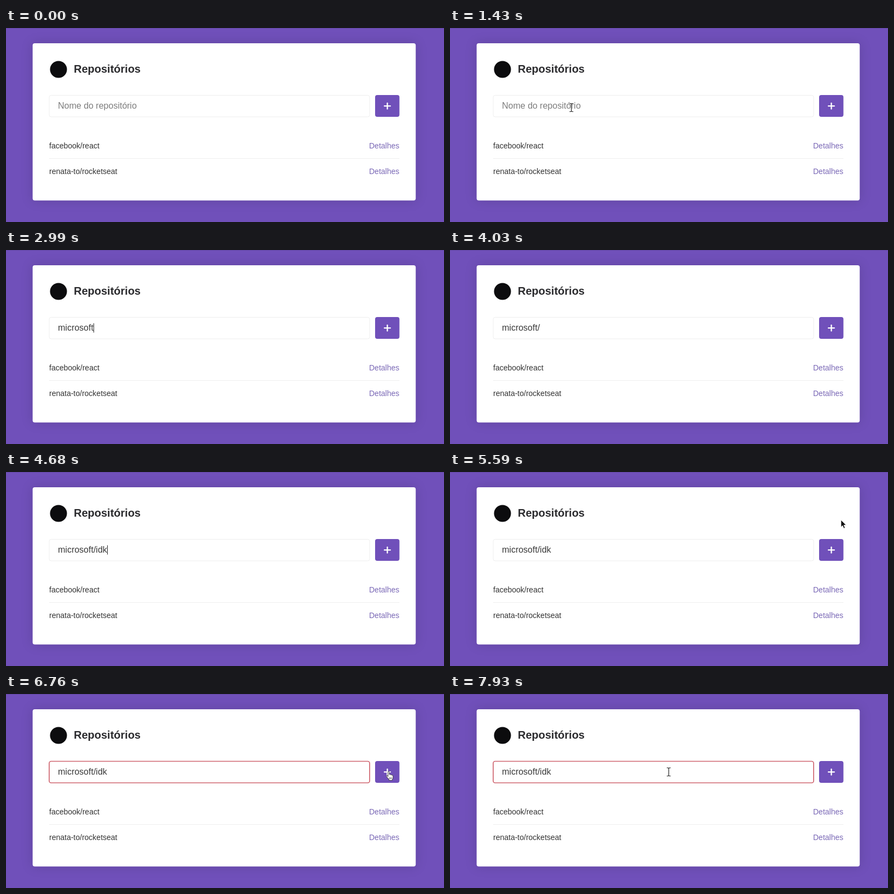
Write an HTML page that moves like this. It is 801 px wide and 356 px high and loops after 8000 ms.

```html
<!DOCTYPE html>
<html lang="pt-BR">
<head>
<meta charset="utf-8">
<title>Repositórios</title>
<style>
  html, body { margin: 0; width: 100%; height: 100%; overflow: hidden; background: #7050ba; }
  svg { display: block; width: 801px; height: 356px; }
  text { font: 14px "Liberation Sans", Arial, sans-serif; fill: #333; }
  .title { font-size: 20px; font-weight: bold; fill: #2b2b2e; }
  .field { font-size: 16px; }
  .link { fill: #7a68b6; }
  .card { fill: #fff; filter: drop-shadow(0 0 10px rgba(0, 0, 0, .14)); }
  .hidden { display: none; }
</style>
</head>
<body>
<svg viewBox="0 0 801 356">
  <rect width="801" height="356" fill="#7050ba"/>
  <rect width="801" height="1" fill="#000" opacity=".1"/>
  <rect class="card" x="48.7" y="28" width="700.6" height="288.5" rx="4"/>

  <circle cx="96" cy="76" r="15.5" fill="#0c0c0e"/>
  <text class="title" x="124" y="82">Repositórios</text>

  <rect id="box" x="79" y="123.5" width="586" height="39.5" rx="3.5" fill="#fff"/>
  <text id="field" class="field" x="95" y="148"></text>
  <rect id="caret" y="134.5" width="1" height="17" fill="#222"/>

  <rect id="button" x="675" y="123" width="44.5" height="40" rx="4"/>
  <path id="plus" d="M692 143.2h10.8M697.4 137.8v10.8" stroke="#fff" stroke-width="2.3" stroke-linecap="round"/>
  <g id="spinner" fill="#fff"></g>

  <text x="79" y="221">facebook/react</text>
  <text class="link" x="664" y="221">Detalhes</text>
  <path d="M79 239.5h640.5" stroke="#eee"/>
  <text x="79" y="268">renata-to/rocketseat</text>
  <text class="link" x="664" y="268">Detalhes</text>

  <g id="pointer">
    <path id="arrow" d="M0 0v13.2l3-2.8 2.2 5 2.3-1-2.2-4.9h4.2z" fill="#111" stroke="#fff" stroke-width=".8"/>
    <g id="beam" fill="none">
      <path d="M-3.5-7.5h2.3l1.2 1 1.2-1h2.3M0-6.5v13M-3.5 7.5h2.3l1.2-1 1.2 1h2.3" stroke="#fff" stroke-width="2.6" opacity=".7"/>
      <path d="M-3.5-7.5h2.3l1.2 1 1.2-1h2.3M0-6.5v13M-3.5 7.5h2.3l1.2-1 1.2 1h2.3" stroke="#222" stroke-width="1.2"/>
    </g>
    <path id="hand" d="M.6 9.5V1.2a1.2 1.2 0 0 1 2.4 0v4.6q1.8-1 2.4.5 1.7-.7 2.3.7 2-.5 2.1 1.5v3q0 1.6-1.2 3v1.8H2.4v-1.6Q-.4 12-2.2 9.2q-.6-1.5.7-1.6 1 .1 2.1 1.9zM5 11.2v2.6M7 11.2v2.6M3.1 11.2v2.6" fill="#fff" stroke="#333" stroke-width=".9" stroke-linejoin="round"/>
  </g>
</svg>
<script>
const LOOP = 8000, STEP = 130;
const LOAD = 6240, FAIL = 6760;
const TEXT = "microsoft/idk";
const keyTimes = [1690, 1820, 1950, 2080, 2210, 2470, 2600, 2730, 2990, 4030, 4160, 4550, 4680];
const caretOn = [[1560, 3510], [4160, 5200]];

// Pointer tracks: points of [time, x, y], shown until "end".
const tracks = [
  { end: 1690, pts: [[130, 262, 313], [390, 241, 222], [780, 222, 146]] },
  { end: LOOP, pts: [[5200, 729, 7], [5590, 715, 88], [5980, 698, 142], [7670, 698, 142], [7930, 400, 143]] }
];

const $ = id => document.getElementById(id);
const show = (id, on) => $(id).classList.toggle("hidden", !on);
const within = (t, [a, b]) => t >= a && t < b;

// Seven dots of an eight-place ring
for (let i = 0; i < 7; i++) {
  const a = i * Math.PI / 4;
  const dot = document.createElementNS("http://www.w3.org/2000/svg", "circle");
  dot.setAttribute("cx", 5.7 * Math.cos(a));
  dot.setAttribute("cy", 5.7 * Math.sin(a));
  dot.setAttribute("r", 1.3);
  $("spinner").append(dot);
}

function place(pts, t) {
  for (let i = 1; i < pts.length; i++) {
    const [t0, x0, y0] = pts[i - 1], [t1, x1, y1] = pts[i];
    if (t <= t1) {
      const k = (t - t0) / (t1 - t0);
      return [x0 + (x1 - x0) * k, y0 + (y1 - y0) * k];
    }
  }
  return pts[pts.length - 1].slice(1);
}

function drawPointer(t) {
  const track = tracks.find(r => within(t, [r.pts[0][0], r.end]));
  show("pointer", track);
  if (!track) return;
  const [x, y] = place(track.pts, t);
  const inRow = y > 123 && y < 163;
  const beam = inRow && x > 79 && x < 665;
  const hand = inRow && x > 675 && x < 719;
  show("beam", beam);
  show("hand", hand);
  show("arrow", !beam && !hand);
  $("pointer").setAttribute("transform", `translate(${x} ${y})`);
}

function drawField(t) {
  const typed = TEXT.slice(0, keyTimes.filter(k => k <= t).length);
  const field = $("field");
  field.textContent = typed || "Nome do repositório";
  field.style.fill = typed ? "#3a3a3a" : "#7d7d7d";
  const width = typed ? field.getComputedTextLength() : 0;
  $("caret").setAttribute("x", 95 + Math.round(width));
  show("caret", caretOn.some(span => within(t, span)));
  const failed = t >= FAIL;
  $("box").setAttribute("stroke", failed ? "#cf6570" : "#eee");
  $("box").setAttribute("stroke-width", failed ? 1.7 : 1);
}

function drawButton(t) {
  const busy = within(t, [LOAD, FAIL]);
  $("button").setAttribute("fill", busy ? "#a996d8" : "#7050ba");
  show("plus", !busy);
  show("spinner", busy);
  $("spinner").setAttribute("transform", `translate(697.4 143) rotate(${(t - LOAD) * .18})`);
}

function frame(now) {
  const t = Math.floor((now % LOOP) / STEP) * STEP;
  drawField(t);
  drawButton(t);
  drawPointer(t);
  requestAnimationFrame(frame);
}
frame(0);
</script>
</body>
</html>
```
